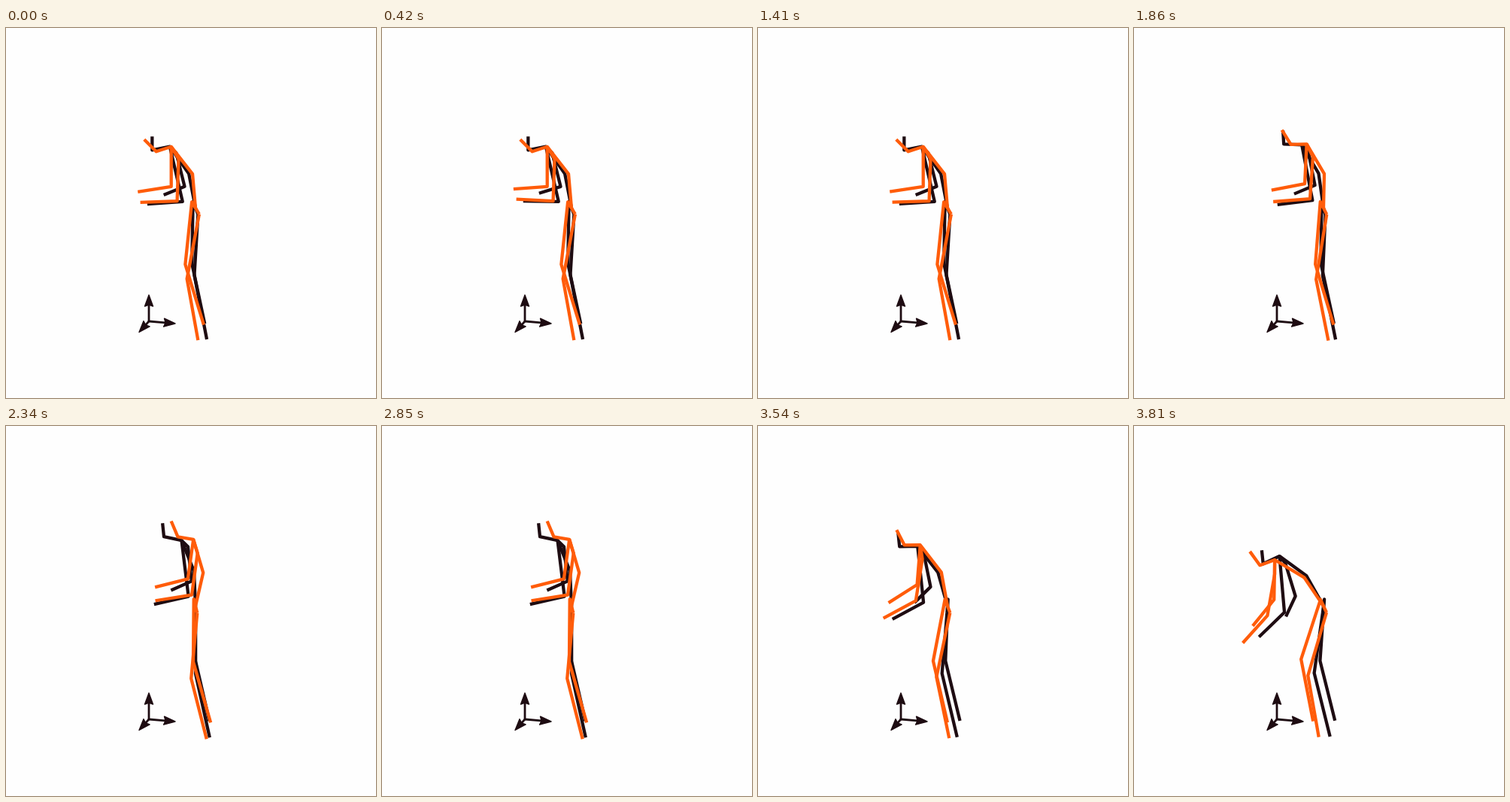
An HTML page with a canvas that plays this animation: 492x492 px, repeating every 3840 ms.

```html
<!DOCTYPE html>
<html>
<head>
<meta charset="utf-8">
<style>
  html, body { margin: 0; width: 100%; height: 100%; overflow: hidden; background: #fefefe; }
  canvas { display: block; }
</style>
</head>
<body>
<canvas id="stage" width="492" height="492"></canvas>
<script>
const ctx = document.getElementById('stage').getContext('2d');
const LOOP = 3840, STEP = 30;
const DARK = '#1e0c12', ORANGE = '#ff5c0a';
const PELVIS = [252, 239.4];

// Each bone: length, then its clock angle (0 = up, 90 = right) when stooped, upright and bent over.
const darkFigure = {
  color: DARK,
  waist: [46.5, -11, -2.5, -29.5],
  chest: [44, -35, -22, -54],
  neck: [24, -101, -78, -115],
  head: [18, 0, -6, -6],
  shoulderA: [12, 135, 135, 140],
  upperArmA: [46, 166, 174, 163],
  forearmA: [30, 248, 246, 205],
  shoulderB: [19, 167, 173, 175],
  upperArmB: [56, 167, 173, 175],
  forearmB: [47, 266, 257, 226],
  hip: [9, 158, 180, 187],
  thighA: [82, 181, 180, 184],
  shinA: [82, 168, 167, 166],
  thighB: [81, 183.5, 180, 188],
  shinB: [87, 169, 167.5, 166]
};

const orangeFigure = {
  color: ORANGE,
  waist: [45.5, -5, 13, -34],
  chest: [46, -38, -16.5, -59],
  neck: [21, -108, -80, -110],
  head: [22.6, -45, -23, -36],
  shoulderA: [18, 180, 188, 181],
  upperArmA: [35, 180, 188, 181],
  forearmA: [45, 261, 256, 219],
  shoulderB: [19, 149, 163, 180],
  upperArmB: [56, 182, 188, 190],
  forearmB: [49, 268, 261, 222],
  hip: [9.5, 149, 166, 155],
  thighA: [83.5, 186, 180.5, 198],
  shinA: [84, 163, 164, 169],
  thighB: [87.5, 190.7, 185.3, 196.4],
  shinB: [83, 169.8, 165.7, 170]
};

const progress = (t, from, to) => Math.min(1, Math.max(0, (t - from) / (to - from)));
const smooth = u => u * u * (3 - 2 * u);

// Straightening starts at the head, bending over starts at the legs.
function lead(name) {
  if (/head|neck/.test(name)) return 0.5;
  return /thigh|shin|hip/.test(name) ? -0.25 : 0;
}

function boneVector(figure, name, t) {
  const [length, stooped, upright, bent] = figure[name];
  const rise = smooth(progress(t, 1630, 2210)) ** (1 - lead(name));
  const bend = (progress(t, 2895, 3810) ** 2) ** (1 + lead(name));
  let angle = stooped + (upright - stooped) * rise + (bent - upright) * bend;
  if (name.startsWith('forearm')) angle += 8 * Math.sin(Math.PI * progress(t, 0, 1500)) ** 2;
  const a = angle * Math.PI / 180;
  return [length * Math.sin(a), -length * Math.cos(a)];
}

function line(points, color, width) {
  ctx.strokeStyle = color;
  ctx.lineWidth = width;
  ctx.lineJoin = 'round';
  ctx.beginPath();
  points.forEach(p => ctx.lineTo(...p));
  ctx.stroke();
}

function drawFigure(figure, t) {
  const chain = (start, ...names) => names.reduce((points, name) => {
    const [x, y] = points.at(-1), [dx, dy] = boneVector(figure, name, t);
    return [...points, [x + dx, y + dy]];
  }, [start]);

  const spine = chain(PELVIS, 'waist', 'chest', 'neck', 'head');
  const thorax = spine[2];
  const hipB = chain(PELVIS, 'hip')[1];
  const hipA = PELVIS.map((c, i) => 2 * c - hipB[i]);
  [
    spine,
    [hipB, ...chain(hipA, 'thighA', 'shinA')],
    chain(hipB, 'thighB', 'shinB'),
    chain(thorax, 'shoulderA', 'upperArmA', 'forearmA'),
    chain(thorax, 'shoulderB', 'upperArmB', 'forearmB')
  ].forEach(points => line(points, figure.color, 4.3));
}

function drawArrow(tipX, tipY) {
  const x = 190, y = 390;
  line([[x, y], [x + (tipX - x) * 0.7, y + (tipY - y) * 0.7]], DARK, 2.8);
  ctx.save();
  ctx.translate(tipX, tipY);
  ctx.rotate(Math.atan2(tipY - y, tipX - x));
  ctx.fillStyle = DARK;
  ctx.beginPath();
  [[0, 0], [-15, -5.5], [-13, 0], [-15, 5.5]].forEach(p => ctx.lineTo(...p));
  ctx.closePath();
  ctx.fill();
  ctx.lineWidth = 1.4;
  ctx.stroke();
  ctx.restore();
}

function frame(now) {
  const t = Math.floor(now % LOOP / STEP) * STEP;
  ctx.fillStyle = '#fefefe';
  ctx.fillRect(0, 0, 492, 492);
  drawArrow(190, 355);
  drawArrow(225, 393);
  drawArrow(177, 404.5);
  drawFigure(darkFigure, t);
  drawFigure(orangeFigure, t);
}

const start = performance.now();
function tick() {
  frame(performance.now() - start);
  requestAnimationFrame(tick);
}
tick();
</script>
</body>
</html>
```
